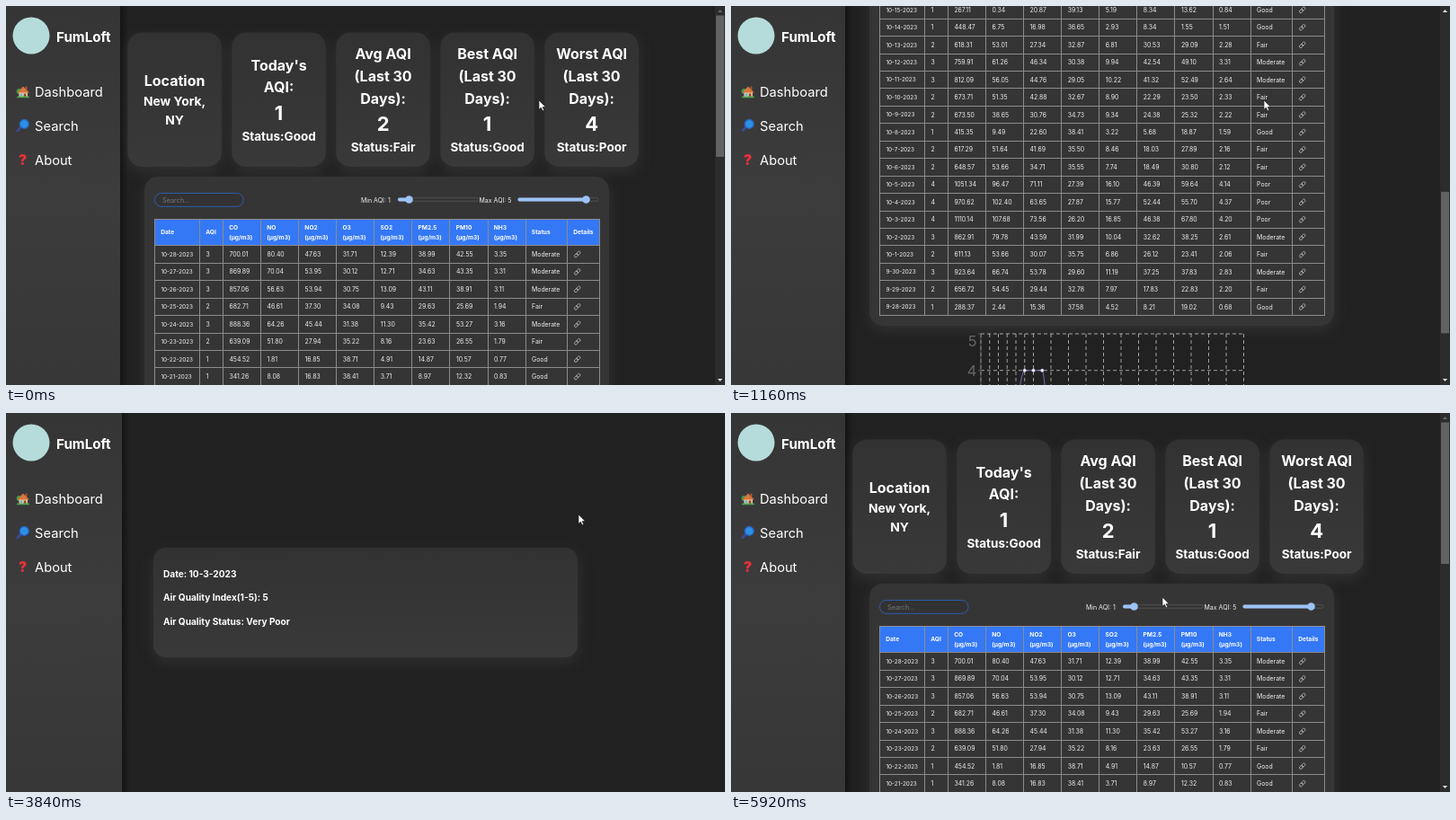
An HTML page that plays this animation: 800 px wide and 422 px high, repeating every 6.16 s.

```html
<!DOCTYPE html>
<html lang="en">
<head>
<meta charset="utf-8">
<title>Air quality dashboard</title>
<style>
html, body { margin: 0; width: 100%; height: 100%; overflow: hidden; background: #222122; }
svg { display: block; width: 100vw; height: 100vh; font-family: Inter, "Open Sans", sans-serif; }
.card { filter: drop-shadow(0 5px 8px rgba(72, 70, 72, .45)); }
.crisp { shape-rendering: crispEdges; }
</style>
</head>
<body>
<svg viewBox="0 0 800 422">
  <defs>
    <linearGradient id="cardFill" x1="0" y1="0" x2="0" y2="1">
      <stop offset="0" stop-color="#333233"/><stop offset="1" stop-color="#3a393a"/>
    </linearGradient>
    <linearGradient id="sideFill" x1="0" y1="0" x2="0" y2="1">
      <stop offset="0" stop-color="#363536"/><stop offset=".5" stop-color="#3d3c3d"/><stop offset="1" stop-color="#383738"/>
    </linearGradient>
    <linearGradient id="sideShade">
      <stop offset="0" stop-color="#000" stop-opacity=".4"/><stop offset="1" stop-color="#000" stop-opacity="0"/>
    </linearGradient>
  </defs>
  <rect width="800" height="422" fill="#222122"/>
  <g id="dash"></g>
  <g id="details"></g>
  <g id="side"></g>
  <g id="bar"></g>
  <g id="pointer"></g>
</svg>
<script>
const LOOP = 6160, STEP = 40;
const [dash, details, side, bar, pointer] =
  ['dash', 'details', 'side', 'bar', 'pointer'].map(id => document.getElementById(id));

function add(parent, tag, attrs, content) {
  const el = document.createElementNS('http://www.w3.org/2000/svg', tag);
  for (const k in attrs) el.setAttribute(k, attrs[k]);
  if (content !== undefined) el.textContent = content;
  parent.appendChild(el);
  return el;
}
const rect = (p, x, y, width, height, fill, more) => add(p, 'rect', { x, y, width, height, fill, ...more });
const circle = (p, cx, cy, r, fill, more) => add(p, 'circle', { cx, cy, r, fill, ...more });
const path = (p, d, stroke, more) => add(p, 'path', { d, stroke, fill: 'none', ...more });
// y is the middle of the line of text
const text = (p, str, x, y, size, more) =>
  add(p, 'text', { x, y: y + size * .36, 'font-size': size, fill: '#fff', ...more }, str);
const bold = { 'font-weight': 700 };
const centred = { ...bold, 'text-anchor': 'middle' };
const range = n => [...Array(n).keys()];

// ---------- data: one AQI digit per day, oldest first; readings follow from it ----------
const series = [...'1232344422122332111233211232333'].map(Number);
const status = ['', 'Good', 'Fair', 'Moderate', 'Poor'];
const dateOf = i => i < 28 ? `10-${28 - i}-2023` : `9-${58 - i}-2023`;
const gases = {
  CO: [250, 1150], NO: [.3, 110], NO2: [11, 75], O3: [40, 25],
  SO2: [2.5, 17], 'PM2.5': [1, 61], PM10: [1.5, 72], NH3: [.6, 4.6]
};
let seed = 7;
function random() {
  seed = (seed * 16807) % 2147483647;
  return seed / 2147483647;
}
const reading = ([lo, hi], level) => (lo + (hi - lo) * (level - 1 + random()) / 4).toFixed(2);

// ---------- dashboard ----------
const summary = (name, n) => [
  [name + ' AQI', 53, 16], ['(Last 30', 78, 16], ['Days):', 103, 16],
  [n, 131, 22], ['Status:' + status[n], 157, 13.5]
];
const cards = [
  [['Location', 83, 16], ['New York,', 106, 13.8], ['NY', 127, 13.8]],
  [["Today's", 66, 16], ['AQI:', 90, 16], ['1', 119, 22], ['Status:Good', 145, 13.5]],
  summary('Avg', 2), summary('Best', 1), summary('Worst', 4)
];
cards.forEach((lines, i) => {
  const x = 187.6 + i * 116;
  rect(dash, x - 52.3, 29.5, 104.6, 149.5, 'url(#cardFill)', { rx: 16, class: 'card' });
  for (const [str, y, size] of lines) text(dash, str, x, y, size, centred);
});

rect(dash, 154, 190, 517, 691, '#363536', { rx: 15, class: 'card' });
rect(dash, 165.5, 208.5, 98.5, 14.8, '#333233', { rx: 7.4, stroke: '#2b62b8', 'stroke-width': .9 });
text(dash, 'Search...', 174, 216, 7.3, { fill: '#777' });

function slider(label, labelX, x, knob) {
  text(dash, label, labelX, 216, 7, { fill: '#f0f0f0' });
  rect(dash, x, 213.8, 89.5, 3.4, '#333233', { rx: 1.7, stroke: '#686768', 'stroke-width': .6 });
  rect(dash, x, 213.6, knob - x, 3.8, '#9bc3f7', { rx: 1.9 });
  circle(dash, knob, 215.5, 4.3, '#9bc3f7');
}
slider('Min AQI: 1', 395, 436, 448.5);
slider('Max AQI: 5', 526.5, 569.5, 645.5);

// ---------- table ----------
const LEFT = 165.5, RIGHT = 660, TOP = 266.8, ROW = 19.45, ROWS = series.length;
const cols = [LEFT, 215.5, ...range(9).map(i => 241.5 + i * 42.08), 624.5, RIGHT];
rect(dash, LEFT, 237, RIGHT - LEFT, TOP - 237, '#3478f6');
const hover = rect(dash, LEFT, 0, RIGHT - LEFT, ROW, '#98ccf7');
['Date', 'AQI', ...Object.keys(gases), 'Status', 'Details'].forEach((name, i) => {
  const x = cols[i] + 6.7;
  text(dash, name, x, name in gases ? 246.5 : 252, 6.6, bold);
  if (name in gases) text(dash, '(µg/m3)', x, 257.3, 6.6, bold);
});
const ruling = [
  `M${LEFT} 237.5H${RIGHT}`,
  ...cols.map(x => `M${Math.floor(x) + .5} 237V${TOP + ROWS * ROW}`),
  ...range(ROWS + 1).map(i => `M${LEFT} ${Math.floor(TOP + i * ROW) + .5}H${RIGHT}`)
].join('');
path(dash, ruling, '#8c8c8c', { class: 'crisp' });

range(ROWS).forEach(i => {
  const y = TOP + (i + .5) * ROW, level = series[ROWS - 1 - i];
  const values = Object.values(gases).map(g => reading(g, level));
  [dateOf(i), level, ...values, status[level]].forEach((cell, k) =>
    text(dash, cell, cols[k] + 6.9, y, k ? 6.9 : 6.4, { fill: '#f2f2f2' }));
  const link = add(dash, 'g', { transform: `translate(635.7 ${y}) rotate(-45)` });
  for (const x of [-4, -.4]) rect(link, x, -1.5, 4.4, 3, 'none', { rx: 1.5, stroke: '#bbb', 'stroke-width': .8 });
});

// ---------- chart ----------
const X0 = 278, DX = 9.75, CHART_TOP = 890, UNIT = 40.75, MAX_SCROLL = 652;
const px = i => X0 + i * DX;
const py = v => CHART_TOP + (5 - v) * UNIT;
const thin = { 'stroke-width': .9 };

const dashes = [
  ...range(ROWS).filter(i => i < 6 || i % 2 === 0).map(i => `M${px(i)} ${py(5)}V${py(1)}`),
  ...range(5).map(i => `M${px(0)} ${py(i + 1)}H${px(30)}`)
].join('');
path(dash, dashes, '#c4c4c4', { 'stroke-width': .8, 'stroke-dasharray': '4 3' });
path(dash, `M${px(0)} ${py(5)}V${py(1)}H${px(30)}`, '#666', thin);
for (let v = 2; v <= 5; v++) {
  path(dash, `M${X0 - 3} ${py(v)}h3`, '#666', thin);
  text(dash, v, 273.5, py(v) + (v === 5 ? 8 : 0), 16.5, { fill: '#666', 'text-anchor': 'end' });
}

// monotone cubic through the daily values
function curve(ys) {
  const s = ys.slice(1).map((y, i) => (y - ys[i]) / DX), last = ys.length - 1;
  const m = ys.map((_, i) => {
    if (i === 0 || i === last) return 0;
    const [a, b] = [s[i - 1], s[i]];
    return (Math.sign(a) + Math.sign(b)) * Math.min(Math.abs(a), Math.abs(b), Math.abs(a + b) / 4);
  });
  m[0] = (3 * s[0] - m[1]) / 2;
  m[last] = (3 * s[last - 1] - m[last - 1]) / 2;
  const h = DX / 3;
  return `M${px(0)} ${ys[0]}` + s.map((_, i) =>
    `C${px(i) + h} ${ys[i] + h * m[i]} ${px(i + 1) - h} ${ys[i + 1] - h * m[i + 1]} ${px(i + 1)} ${ys[i + 1]}`).join('');
}
path(dash, curve(series.map(py)), '#7f7bc4', thin);
const rule = path(dash, `M0 ${py(5)}V${py(1)}`, '#ccc', thin);
series.forEach((v, i) => circle(dash, px(i), py(v), 1.7, '#fff', { stroke: '#b9b6ec', 'stroke-width': .4 }));
const dot = circle(dash, 0, 0, 2.5, '#8884d8', { stroke: '#fff', 'stroke-width': 1.1 });
const tip = text(dash, '', 0, 0, 14.6);

// ---------- details page ----------
rect(details, 164, 150, 472, 122, 'url(#cardFill)', { rx: 14, class: 'card' });
['Date: 10-3-2023', 'Air Quality Index(1-5): 5', 'Air Quality Status: Very Poor']
  .forEach((s, i) => text(details, s, 175, 179.3 + i * 26.4, 10.1, bold));

// ---------- sidebar ----------
const shade = rect(side, 127, 0, 9, 422, 'url(#sideShade)');
const panel = rect(side, 0, 0, 127, 422, 'url(#sideFill)');
circle(side, 28, 33, 20.5, '#b5dcda');
text(side, 'FumLoft', 56, 35, 15.2, bold);
['Dashboard', 'Search', 'About'].forEach((s, i) => text(side, s, 32, 95.3 + i * 38, 14.7));
// house with tree
circle(side, 14.6, 95, 3, '#3f9a4a');
rect(side, 14.5, 95.5, 9.5, 6.5, '#e9c9a0');
rect(side, 21.5, 89.5, 2, 4, '#a3543a');
add(side, 'path', { d: 'M12.5 96.5L19 89.5 26 96.5Z', fill: '#d9743c' });
rect(side, 19.8, 97.5, 2.6, 4.5, '#8a4b2d');
rect(side, 15.8, 97.5, 2.5, 2.5, '#5fb4e8');
rect(side, 12, 100.5, 14, 1.8, '#4ca552', { rx: .9 });
// magnifier
path(side, 'M12.8 138.8L16.5 135', '#3b4a9c', { 'stroke-width': 2.6, 'stroke-linecap': 'round' });
circle(side, 20.3, 131.4, 4.9, '#2f8fe6', { stroke: '#2368c4', 'stroke-width': 1.3 });
text(side, '?', 18.6, 171.3, 15.5, { ...centred, fill: '#e8303a', 'font-weight': 900 });

// ---------- scrollbar ----------
rect(bar, 789, 0, 11, 422, '#2c2c2c');
const thumb = rect(bar, 790, 10.5, 9, 157.5, '#626262');
const upArrow = add(bar, 'path', { d: 'M791.8 7L794.5 4 797.2 7Z' });
const downArrow = add(bar, 'path', { d: 'M791.8 415L794.5 418 797.2 415Z' });

// ---------- pointer ----------
const ink = { fill: '#fff', stroke: '#1a1a1a', 'stroke-width': .6, 'stroke-linejoin': 'round' };
const arrow = add(pointer, 'path', { d: 'M0 0V10.3L2.4 8.1 4 11.8 5.7 11.1 4.1 7.5H7.3Z', ...ink });
const hand = add(pointer, 'path', {
  d: 'M0 1Q1.1-.8 2.2 1V5Q3.4 4.2 4.2 5.2 5.4 4.6 6.1 5.7 7.6 5.3 7.8 7V10.5Q7.6 12.5 6.6 13.3V15H.6V13.5L-3.2 9.2Q-2.6 7.2 0 9.2Z',
  ...ink
});

// ---------- motion ----------
const PAGE_DETAILS = 3520, PAGE_BACK = 5120;
// pointer stops: time, x, y
const route = [
  [0, 593, 105], [1560, 593, 105], [1880, 322, 290], [2040, 376, 330], [2200, 455, 336],
  [2640, 602, 260], [2840, 664, 168], [3000, 705, 132], [3120, 645, 119], [3240, 637, 113],
  [4200, 637, 113], [4440, 370, 148], [4720, 84, 95], [4840, 84, 95], [5040, 127, 101],
  [5480, 480, 205], [LOOP, 480, 205]
];
function at(t) {
  const k = Math.max(1, route.findIndex(p => p[0] >= t));
  const [a, b] = [route[k - 1], route[k]];
  const u = (t - a[0]) / (b[0] - a[0]);
  return { x: a[1] + (b[1] - a[1]) * u, y: a[2] + (b[2] - a[2]) * u };
}
const clamp = (v, lo, hi) => Math.min(hi, Math.max(lo, v));
function ease(t, from, to) {
  const u = clamp((t - from) / (to - from), 0, 1);
  return u * u * (3 - 2 * u);
}
const scrollAt = t => t >= PAGE_BACK ? 0
  : Math.round(449 * ease(t, 480, 720) + 203 * ease(t, 960, 1440));
const show = (el, on) => el.setAttribute('display', on ? 'inline' : 'none');
const inChart = p => p.x > X0 - 5 && p.x < px(30) + 5 && p.y > 238 && p.y < 402;

function drawTip(t, p, scroll) {
  const i = clamp(Math.round((at(t + STEP).x - X0) / DX - .6), 0, 30);
  rule.setAttribute('transform', `translate(${px(i)} 0)`);
  dot.setAttribute('cx', px(i));
  dot.setAttribute('cy', py(series[i]));
  // the label trails behind the pointer
  const back = at(t - 160), q = inChart(back) ? back : p;
  tip.textContent = 'AQI: ' + series[i];
  tip.setAttribute('x', q.x + 8.5);
  tip.setAttribute('y', q.y + 18.3 + scroll);
}

function draw(ms) {
  const t = Math.floor(ms / STEP) * STEP;
  const onDetails = t >= PAGE_DETAILS && t < PAGE_BACK;
  const scroll = scrollAt(t), p = at(t);
  const moved = t >= 1600 && t < PAGE_DETAILS;

  show(dash, !onDetails);
  show(bar, !onDetails);
  show(details, onDetails && t >= 3600);
  dash.setAttribute('transform', `translate(0 ${-scroll})`);
  const edge = onDetails ? 129 : 127;
  panel.setAttribute('width', edge);
  shade.setAttribute('x', edge);
  thumb.setAttribute('y', 10.5 + scroll * .374);
  upArrow.setAttribute('fill', scroll > 0 ? '#ddd' : '#666');
  downArrow.setAttribute('fill', scroll < MAX_SCROLL ? '#ddd' : '#666');

  const row = Math.floor((p.y + scroll - TOP) / ROW);
  const overRow = moved && row >= 0 && row < ROWS && p.x > LEFT && p.x < RIGHT;
  show(hover, overRow);
  hover.setAttribute('y', TOP + row * ROW);

  const active = moved && inChart(p);
  for (const el of [rule, dot, tip]) show(el, active);
  if (active) drawTip(t, p, scroll);

  const onLink = overRow && Math.abs(p.x - 636) < 5;
  const onMenu = p.x < 130 && p.y > 78 && p.y < 190;
  show(hand, onLink || onMenu);
  show(arrow, !onLink && !onMenu);
  pointer.setAttribute('transform', `translate(${p.x} ${p.y})`);
}

const start = performance.now();
function tick() {
  draw((performance.now() - start) % LOOP);
  requestAnimationFrame(tick);
}
tick();
</script>
</body>
</html>
```
